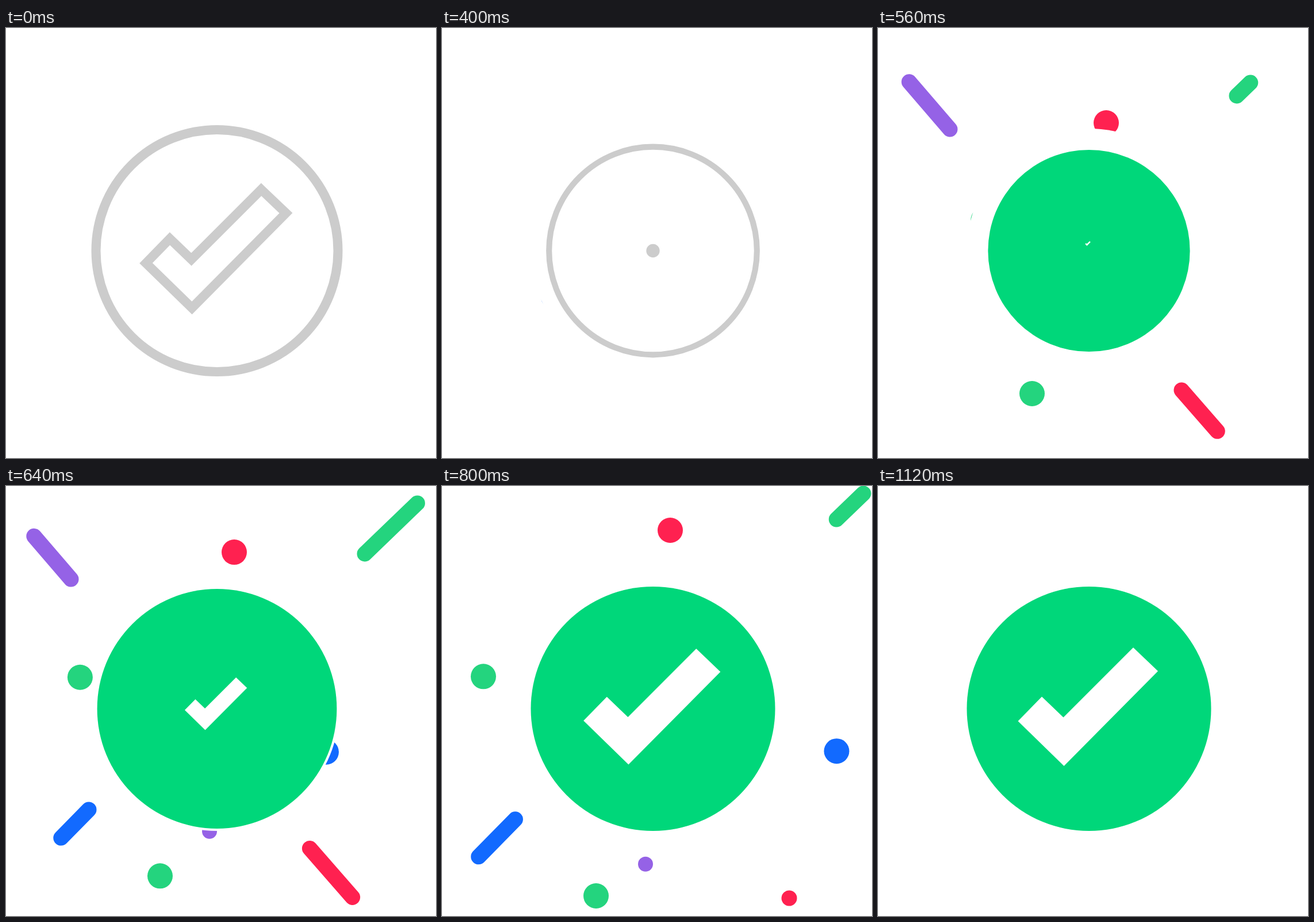
An HTML page with a canvas that plays this animation: 748 px wide and 748 px high, repeating every 1.24 s.

```html
<!DOCTYPE html>
<html lang="en">
<head>
<meta charset="utf-8">
<title>Check burst</title>
<style>
html, body { margin: 0; width: 100%; height: 100%; overflow: hidden; background: #fff; }
canvas { display: block; width: 748px; height: 748px; }
</style>
</head>
<body>
<canvas id="stage" width="748" height="748"></canvas>
<script>
const ctx = document.getElementById('stage').getContext('2d');
const LOOP = 1240, STEP = 40, CX = 367, CY = 387.5, R = 212.5;
const GRAY = [204, 204, 204], GREEN = [0, 215, 122];
const MINT = '#24d47e', RED = '#ff2150', PURPLE = '#9562e6', BLUE = '#126aff';
const CHECK = [[444, 281], [487, 322], [323.5, 487], [243.5, 409], [285, 366.5], [322.5, 402.5]];

// start x, y, end x, y, radius, colour, start time, duration
const balls = [
  [397, 245, 397, 74.7, 22, RED, 480, 420],
  [268, 549, 268, 716, 22, MINT, 460, 460],
  [260, 336, 58, 331, 22, MINT, 480, 543],
  [194, 467, 703, 461, 22, BLUE, 480, 470],
  [354, 441, 354, 665, 13, PURPLE, 480, 470]
];

// start x, y, end x, y, colour, delay
const streaks = [
  [125, 176, 48.5, 87, PURPLE, -110],
  [528, 630, 604, 717, RED, -75],
  [624, 118, 733, 13, MINT, 0],
  [144, 563, 63.5, 645, BLUE, 43]
];

const span = (t, from, to) => Math.min(1, Math.max(0, (t - from) / (to - from)));
const mix = (a, b, k) => a + (b - a) * k;
const easeOut = (u, power) => 1 - (1 - u) ** power;
const smooth = u => u * u * (3 - 2 * u);

function disc(x, y, r, color) {
  ctx.fillStyle = color;
  ctx.beginPath();
  ctx.arc(x, y, r, 0, 2 * Math.PI);
  ctx.fill();
}

function check(scale, x, y, outline) {
  if (scale <= 0) return;
  ctx.save();
  ctx.translate(x, y);
  ctx.scale(scale, scale);
  ctx.translate(-x, -y);
  ctx.beginPath();
  for (const p of CHECK) ctx.lineTo(...p);
  ctx.closePath();
  if (outline) {
    ctx.strokeStyle = '#ccc';
    ctx.lineWidth = 16;
    ctx.stroke();
  } else {
    ctx.fillStyle = '#fff';
    ctx.fill();
  }
  ctx.restore();
}

function drawBall(t, [x0, y0, x1, y1, r, color, start, time]) {
  const k = easeOut(span(t, start, start + time), 3);
  const size = 1 - smooth(span(t, 800, 1115));
  disc(mix(x0, x1, k), mix(y0, y1, k), r * size, color);
}

function drawStreak(t, [x0, y0, x1, y1, color, delay]) {
  const local = t - delay;
  if (local < 546 || local >= 876) return;
  const head = easeOut(span(local, 545, 845), 4.8);
  const tail = smooth(span(local, 708, 876));
  ctx.strokeStyle = color;
  ctx.lineWidth = 27;
  ctx.lineCap = 'round';
  ctx.beginPath();
  ctx.moveTo(mix(x0, x1, tail), mix(y0, y1, tail));
  ctx.lineTo(mix(x0, x1, head), mix(y0, y1, head));
  ctx.stroke();
}

function drawRing(t) {
  if (t >= 560) return;
  const k = smooth(span(t, 205, 600));
  ctx.strokeStyle = '#ccc';
  ctx.lineWidth = mix(16, 4, k);
  ctx.beginPath();
  ctx.arc(CX, CY, mix(210.5, 150, k), 0, 2 * Math.PI);
  ctx.stroke();
}

function draw(t) {
  ctx.fillStyle = '#fff';
  ctx.fillRect(0, 0, 748, 748);
  for (const b of balls) drawBall(t, b);
  for (const s of streaks) drawStreak(t, s);

  // white plate hides the balls until they leave the badge
  disc(CX, CY, R, '#fff');
  drawRing(t);
  check(1 - smooth(span(t, 230, 395)), CX, CY, true);

  const tint = span(t, 400, 520);
  const color = GRAY.map((g, i) => Math.round(mix(g, GREEN[i], tint)));
  disc(CX, CY, R * easeOut(span(t, 392, 680), 2), `rgb(${color})`);
  check(easeOut(span(t, 553, 821), 1.5), 365, 374.5, false);
}

const begin = performance.now();
function tick() {
  const t = (performance.now() - begin) % LOOP;
  draw(Math.floor(t / STEP) * STEP);
  requestAnimationFrame(tick);
}
tick();
</script>
</body>
</html>
```
